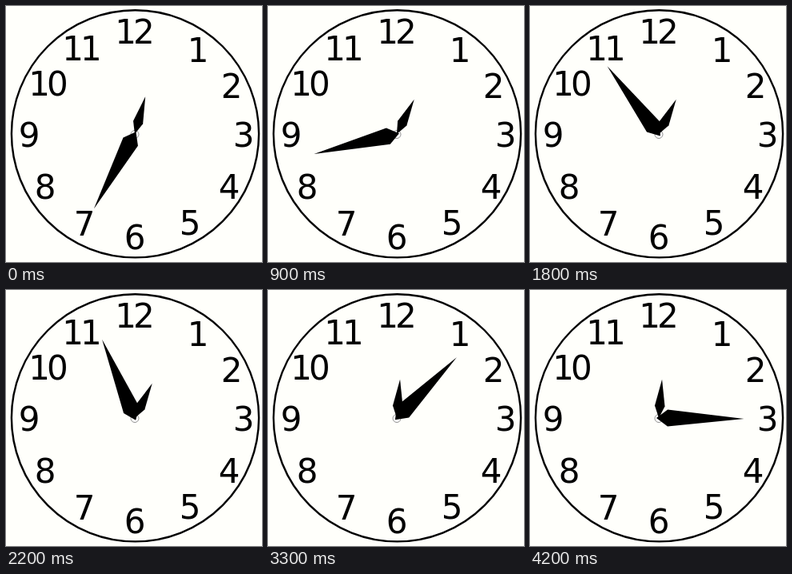
Recreate the animation shown at these times as an HTML page. Size 320 by 320 pixels, loop 4400 ms.

```html
<!DOCTYPE html>
<html lang="en">
<head>
<meta charset="utf-8">
<title>Clock</title>
<style>
  html, body { margin: 0; width: 100%; height: 100%; overflow: hidden; background: #fffffb; }
  svg { display: block; width: 100vw; height: 100vh; }
  text {
    font: 42px "DejaVu Sans", sans-serif;
    letter-spacing: -4px;
    text-anchor: middle;
  }
</style>
</head>
<body>
<svg viewBox="0 0 320 320">
  <circle cx="161.5" cy="159.8" r="154.6" fill="none" stroke="#000" stroke-width="2.4"/>
  <g id="numerals"></g>
  <circle cx="161" cy="160.5" r="5" fill="#fff" stroke="#777" stroke-width="0.8"/>
  <g transform="translate(161 160)">
    <polygon id="hour" points="0,-48.5 6.3,-15 0,0 -6.3,-15"/>
    <polygon id="minute" points="0,-106.5 10.5,-11 0,3 -10.5,-11"/>
  </g>
</svg>
<script>
  const LOOP = 4400, TICK = 100;

  // Centres of the numerals 1 to 12
  const centres = [
    [240, 55], [282, 100], [297, 161], [279, 226], [230, 271], [161, 289],
    [98, 272], [49, 226], [29, 161], [53, 97], [95, 53], [161, 32]
  ];

  // Time in ms, minute hand angle in degrees
  const path = [
    [0, 208.7], [600, 247], [900, 256.4], [1400, 290.5], [1800, 322.8],
    [1900, 322.8], [2200, 337.4], [2300, 337.4], [2800, 371.2], [2900, 379.6],
    [3300, 404.6], [3500, 416.2], [4100, 450.5], [LOOP, 450.5]
  ];

  const byId = id => document.getElementById(id);

  byId('numerals').innerHTML = centres.map(([x, y], i) =>
    `<text x="${x - 2}" y="${y + 15.3}">${i + 1}</text>`).join('');

  function minuteAngle(t) {
    const next = path.findIndex(([time]) => time > t);
    const [t0, a0] = path[next - 1], [t1, a1] = path[next];
    return a0 + (a1 - a0) * (t - t0) / (t1 - t0);
  }

  // The hour hand jumps three times an hour
  function hourAngle(minute) {
    if (minute >= 360) return 4.8;
    return minute >= 240 ? 26.6 : 15.8;
  }

  function turn(id, angle) {
    byId(id).setAttribute('transform', `rotate(${angle})`);
  }

  function draw(now) {
    const t = Math.floor((now % LOOP) / TICK) * TICK;
    const minute = minuteAngle(t);
    turn('minute', minute);
    turn('hour', hourAngle(minute));
  }

  const start = performance.now();
  function frame() {
    draw(performance.now() - start);
    requestAnimationFrame(frame);
  }
  frame();
</script>
</body>
</html>
```
